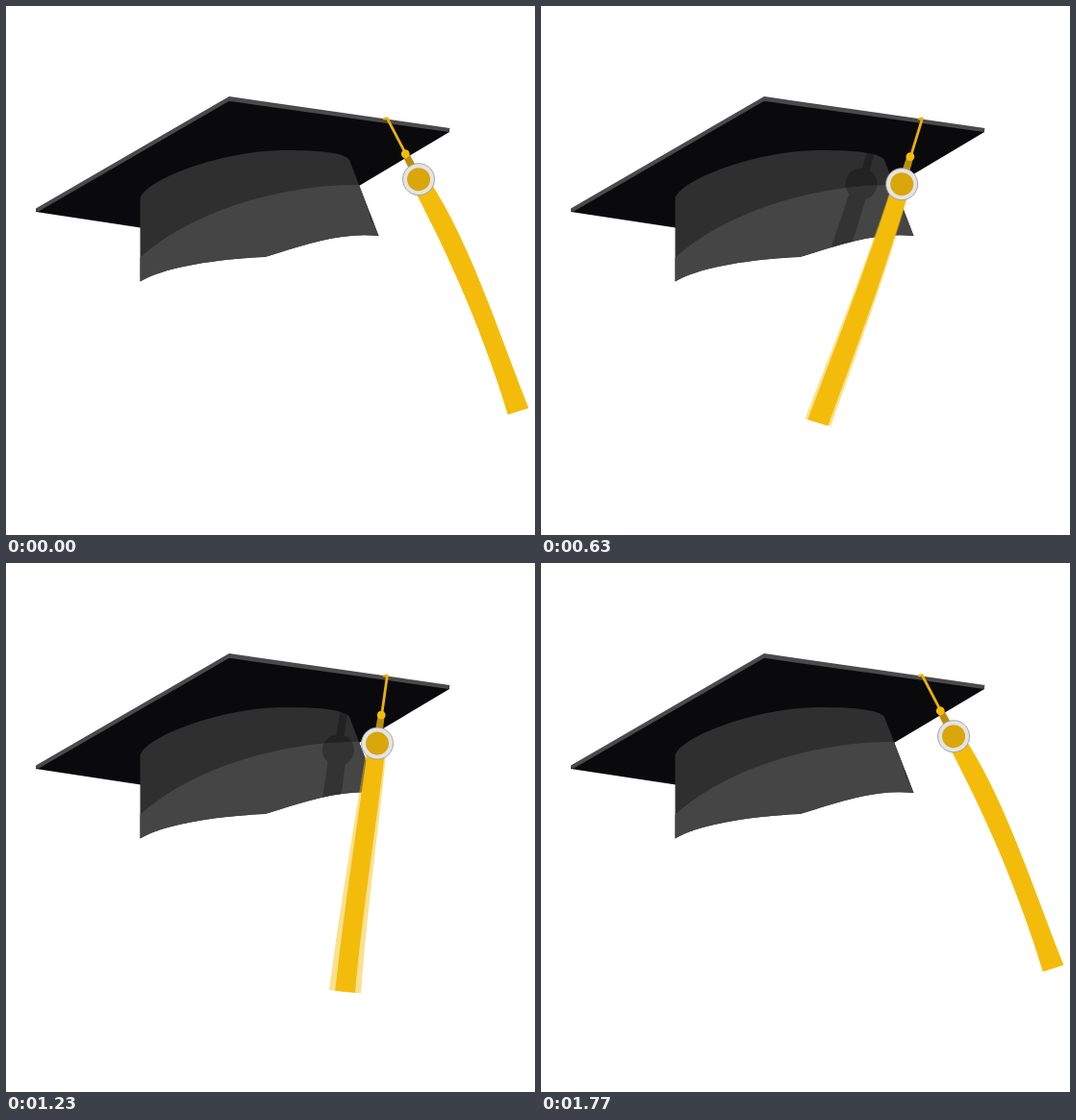
An HTML page without scripts that plays this animation: 550 by 550 pixels, repeating every 1800 ms.

```html
<!DOCTYPE html>
<html lang="en">
<head>
<meta charset="utf-8">
<title>Graduation cap</title>
<style>
/* --a: swing in degrees to the right, --s: spread of the motion blur */
@property --a { syntax: "<number>"; inherits: true; initial-value: 27.6; }
@property --s { syntax: "<number>"; inherits: true; initial-value: 0; }

html, body { margin: 0; width: 100%; height: 100%; overflow: hidden; background: #fff; }
svg { display: block; width: 100vw; height: 100vh; animation: swing 1.8s steps(3) infinite; }

.swing { transform: rotate(calc(var(--a) * -1deg)); }
.cast {
  transform: translate(calc(var(--a) * .17px - 39.3px), calc(var(--a) * .8px + 13.7px))
    rotate(calc(var(--a) * -1deg));
}
.ribbon {
  d: path("M-9 78C-9 160 -14 240 -31 331L-9 335C0 250 17 150 9 78Z");
  animation: bend 1.8s infinite;
}
.blur { opacity: .45; }
.fore { transform: rotate(calc(var(--s) * 1deg)); }
.aft { transform: rotate(calc(var(--s) * -1deg)); }

@keyframes swing {
  0%   { --a: 27.6; --s: 0; }
  5%   { --a: 27.6; }
  10%  { --a: 27.4; }
  15%  { --a: 26.8; }
  20%  { --a: 24.4; --s: .1; }
  25%  { --a: 16;   --s: .3; }
  30%  { --a: 2;    --s: .6; }
  35%  { --a: -17;  --s: .5; }
  40%  { --a: -24;  --s: .2; }
  45%  { --a: -26.9; --s: 0; }
  50%  { --a: -27.5; }
  55%  { --a: -26.5; --s: 0; }
  60%  { --a: -24;  --s: .3; }
  65%  { --a: -15.5; --s: .8; }
  70%  { --a: -4.3; --s: 1.2; }
  75%  { --a: 10;   --s: .6; }
  80%  { --a: 23;   --s: .1; }
  85%  { --a: 26.5; --s: 0; }
  90%  { --a: 27.4; }
  95%  { --a: 27.6; }
  100% { --a: 27.6; --s: 0; }
}

@keyframes bend {
  0%, 10%, 90%, 100% {
    d: path("M-9 78C-9 160 -14 240 -31 331L-9 335C0 250 17 150 9 78Z");
    animation-timing-function: steps(9);
  }
  25%, 30%, 70%, 80% {
    d: path("M-9 78C-9 160 -9 245 -2.5 332L18.5 330.5C11 245 10 160 9 78Z");
    animation-timing-function: steps(6);
  }
  35% {
    d: path("M-9 78C-10 160 -16 245 -22 334L0 334C5 245 10 160 9 78Z");
    animation-timing-function: steps(9);
  }
  50%, 55% {
    d: path("M-9 78C-9 165 -20 245 -48 332L-28 337C-8 250 20 160 9 78Z");
    animation-timing-function: steps(9);
  }
}
</style>
</head>
<body>
<svg viewBox="0 0 550 550">
  <defs>
    <path id="band" d="M139.5 200C145 180 225 150 290 150C330 150 352 153 357 160L367 186L387.5 239C345 234 300 252 269 261C220 263 165 271 139.5 286.5Z"/>
    <clipPath id="onBand"><use href="#band"/></clipPath>
  </defs>

  <!-- board -->
  <path fill="#0a0a0c" d="M31 213L232 96L461 129V131L367 187L300 220L140 230.5L31 214Z"/>
  <path fill="#4a4a4b" d="M31 210.5L232 94L461.5 127L460.5 131L232 98.8L34 213.5L31 213.5Z"/>

  <!-- band -->
  <use href="#band" fill="#2f2f2f"/>
  <g clip-path="url(#onBand)">
    <path fill="#454545" d="M139 262C190 215 285 185 367 186H400V300H139Z"/>
    <g transform="translate(396 117)" opacity=".26">
      <g class="cast">
        <path d="M-1 0H1L4 40V60H-4V40Z"/>
        <circle cy="71" r="16.5"/>
        <path class="ribbon"/>
      </g>
    </g>
  </g>

  <!-- tassel -->
  <g transform="translate(396 117)" fill="#f4bc0a">
    <path d="M-3 .3L0 0" fill="none" stroke="#e9b20a" stroke-width="2.5" stroke-linecap="round"/>
    <g class="swing">
      <path class="ribbon blur fore"/>
      <path class="ribbon blur aft"/>
      <path class="ribbon"/>
      <path d="M.4 0V41" stroke="#e9b20a" stroke-width="2.8" stroke-linecap="round"/>
      <path d="M-3.5 42H3.5L4 60H-4Z" fill="#b98e0c"/>
      <circle cy="41.5" r="4.4"/>
      <circle cy="71.3" r="16.5" fill="#e4e4e4" stroke="#9a9a9a" stroke-width=".8"/>
      <circle cy="71.3" r="12" fill="#d9a60c"/>
    </g>
  </g>
</svg>
</body>
</html>
```
